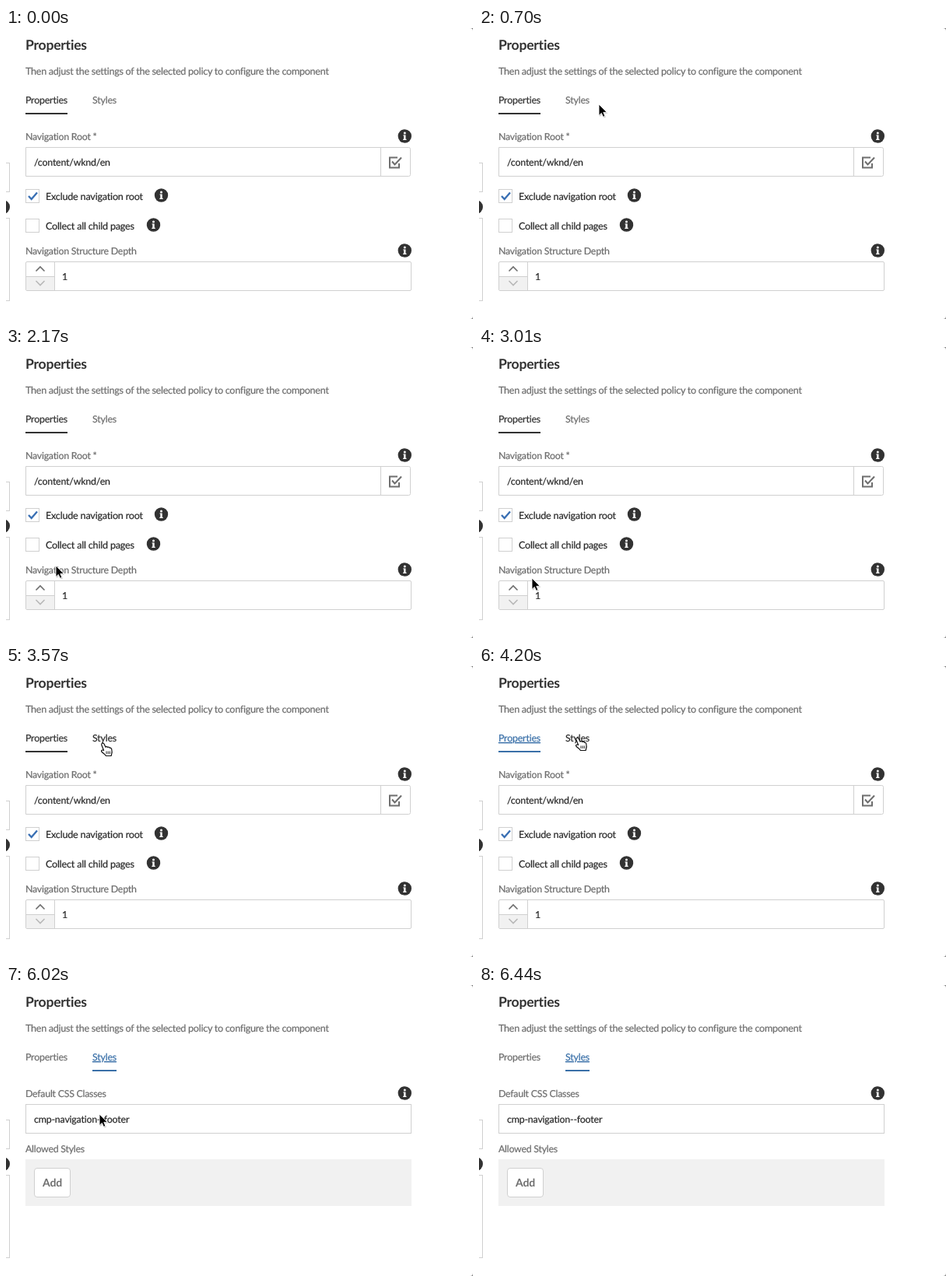
An HTML page that plays this animation: 600 px wide and 374 px high, repeating every 6.86 s.

```html
<!DOCTYPE html>
<html lang="en">
<head>
<meta charset="utf-8">
<title>Policy properties</title>
<style>
  html, body { margin: 0; width: 100%; height: 100%; overflow: hidden; background: #8c8c8c; }
  svg { display: block; width: 600px; height: 374px; }
  text {
    font: 12.4px Lato, "Open Sans", sans-serif; letter-spacing: -.26px;
    text-rendering: geometricPrecision;
    color: #6e6e6e; fill: currentColor; stroke: currentColor; stroke-width: .22px;
  }
  .title { font-size: 17.6px; font-weight: 700; letter-spacing: -.25px; color: #323232; }
  .intro { font-size: 12.6px; letter-spacing: -.28px; }
  .option { font-size: 12.6px; letter-spacing: -.2px; }
  .value { letter-spacing: -.2px; }
  .value, .option { color: #2a2a2a; }
  .add { font-size: 14px; font-weight: 700; letter-spacing: -.1px; }
  .title, .add { stroke: none; }
  .box { fill: #fff; stroke: #d0d0d0; }
  .line { fill: none; stroke: #6e6e6e; stroke-width: 2; }
  .tab text { letter-spacing: -.2px; }
  .tab rect { display: none; }
  .tab.hover text { color: #2a2a2a; }
  .tab.active text { color: #323232; }
  .tab.active rect { display: inline; fill: #323232; }
  .tab.focus text { color: #3a70a8; text-decoration: underline; }
  .tab.focus rect { display: inline; fill: #3a70a8; }
</style>
</head>
<body>
<svg viewBox="0 0 600 374">
  <defs>
    <g id="info">
      <circle r="8.7" fill="#323232"/>
      <circle cy="-4" r="1.5" fill="#fff"/>
      <path d="M-2-1.500H1.200V3.800H2.200V5H-2.200V3.800H-1.200V-.4H-2Z" fill="#fff"/>
    </g>
  </defs>

  <rect x="-10" width="610" height="374" rx="4" fill="#fff"/>
  <rect class="box" x="-20.5" y="173.5" width="25" height="37"/>
  <rect class="box" x="-20.5" y="244.5" width="25" height="106"/>
  <use href="#info" x="-3.7" y="230"/>

  <text class="title" x="25" y="28">Properties</text>
  <text class="intro" x="25" y="60">Then adjust the settings of the selected policy to configure the component</text>
  <g class="tab" id="propsTab"><text x="25" y="97">Properties</text><rect x="25" y="109" width="54" height="2"/></g>
  <g class="tab" id="stylesTab"><text x="111" y="97">Styles</text><rect x="111" y="109" width="31" height="2"/></g>
  <use href="#info" x="512.3" y="139"/>

  <g id="propsPanel">
    <text x="25" y="144">Navigation Root *</text>
    <path class="box" d="M25.5 153.5H517.5q2 0 2 2V188.5q0 2-2 2H25.5ZM481.5 153.5V190.5"/>
    <text class="value" x="36" y="177">/content/wknd/en</text>
    <path class="line" d="M505 174V179.5H493V166.5H503M496 171.5L499.5 175.5L508 166.5"/>

    <rect class="box" x="25.5" y="207.5" width="17" height="17"/>
    <path class="line" d="M29 216L32.7 220L40 211.5" style="stroke:#3a70b4;stroke-width:2.4"/>
    <text class="option" x="51" y="221">Exclude navigation root</text>
    <use href="#info" x="199.5" y="215"/>

    <rect class="box" x="25.5" y="245.5" width="17" height="17"/>
    <text class="option" x="51" y="259">Collect all child pages</text>
    <use href="#info" x="189.5" y="253"/>

    <text x="25" y="291">Navigation Structure Depth</text>
    <use href="#info" x="512.3" y="286"/>
    <rect class="box" x="25.5" y="300.5" width="495" height="37" rx="1.5"/>
    <rect x="26" y="320" width="36" height="17" fill="#f1f1f1"/>
    <path class="box" d="M62.5 300.5V337.5M26 319.5H62"/>
    <path class="line" d="M38.5 312.5L44 307L49.5 312.5" style="stroke-width:1.6"/>
    <path class="line" d="M38.5 325L44 330.5L49.5 325" style="stroke:#b8b8b8;stroke-width:1.6"/>
    <text class="value" x="72" y="324">1</text>
  </g>

  <g id="stylesPanel">
    <text x="25" y="144">Default CSS Classes</text>
    <rect class="box" x="25.5" y="153.5" width="495" height="37"/>
    <text class="value" x="36" y="177">cmp-navigation--footer</text>
    <text x="25" y="215">Allowed Styles</text>
    <rect x="25" y="224" width="496" height="60" fill="#f1f1f1"/>
    <rect class="box" x="36.5" y="235.5" width="46" height="37" rx="3.5"/>
    <text class="add" x="47" y="259">Add</text>
  </g>

  <g id="pointer">
    <g id="arrow">
      <path d="M1 1.5V16L4.4 12.8L6.5 17.5L9 16.5L7 11.7H11.5Z" fill="#000" opacity=".2"/>
      <path d="M0 0V14.5L3.3 11.4L5.5 16.3L7.9 15.3L5.8 10.4H10.3Z" fill="#000" stroke="#fff" stroke-width=".9"/>
    </g>
    <g id="hand" stroke="#111" stroke-width="1.2" stroke-linejoin="round">
      <path fill="#fff" d="M-1.4 9.5L-4.2 2.6C-4.8 .2-1.8-.8-.8 1.4L1 5.3c.6-1 2.3-.9 2.7.3c.8-.7 2.3-.4 2.6.8c1-.5 2.2.2 2.4 1.4c.5 2.4.9 4 0 6.2l-.6 2.5H1.4c-1.2-2.2-3.4-3-5.6-5.5c-1-1.3.9-2.7 2.8-1.5Z"/>
      <path fill="none" stroke-width=".9" d="M2 10.500v3.500M4.200 10.500v3.500M6.300 10.500v3.500"/>
    </g>
  </g>
</svg>
<script>
const LOOP = 6860, STEP = 70, FOCUS = 3710, SWITCH = 4480;
const smooth = u => u * u * (3 - 2 * u);
const slowIn = u => u * u;
const slowOut = u => 1 - (1 - u) * (1 - u);

// time, x, y, easing on the way there
const path = [
  [0, 290, 376], [700, 154, 98, slowOut],
  [1120, 76, 174], [1260, 85, 168], [1330, 85, 168],
  [1470, 72, 187], [1610, 56, 217], [1890, 56, 217],
  [2240, 65, 288], [2310, 65, 288], [2520, 68, 299], [2940, 68, 299],
  [3010, 68, 297], [3640, 129, 92], [3780, 139, 72], [3920, 129, 97],
  [3990, 129, 97], [4200, 129, 92], [4900, 129, 92], [4970, 129, 104],
  [5180, 114, 157], [5320, 117, 162], [5950, 117, 162],
  [6440, 275, 376, slowIn], [LOOP, 275, 376]
];
const el = id => document.getElementById(id);
const show = (id, on) => el(id).setAttribute('display', on ? 'inline' : 'none');

function pointerAt(t) {
  const i = path.findIndex(p => p[0] > t);
  const [t0, x0, y0] = path[i - 1], [t1, x1, y1, ease = smooth] = path[i];
  const u = ease((t - t0) / (t1 - t0));
  return [x0 + (x1 - x0) * u, y0 + (y1 - y0) * u].map(Math.round);
}

function draw(now) {
  const t = Math.floor(now % LOOP / STEP) * STEP;
  const [x, y] = pointerAt(t);
  const overStyles = x >= 111 && x <= 142 && y >= 83 && y <= 111;
  const switched = t >= SWITCH;

  el('pointer').setAttribute('transform', `translate(${x} ${y})`);
  show('hand', overStyles);
  show('arrow', !overStyles);
  show('propsPanel', !switched);
  show('stylesPanel', switched);
  el('propsTab').setAttribute('class', 'tab ' + (switched ? '' : t >= FOCUS ? 'focus' : 'active'));
  el('stylesTab').setAttribute('class', 'tab ' + (switched ? 'focus' : overStyles ? 'hover' : ''));
}

const start = performance.now();
function tick() {
  draw(performance.now() - start);
  requestAnimationFrame(tick);
}
tick();
</script>
</body>
</html>
```
